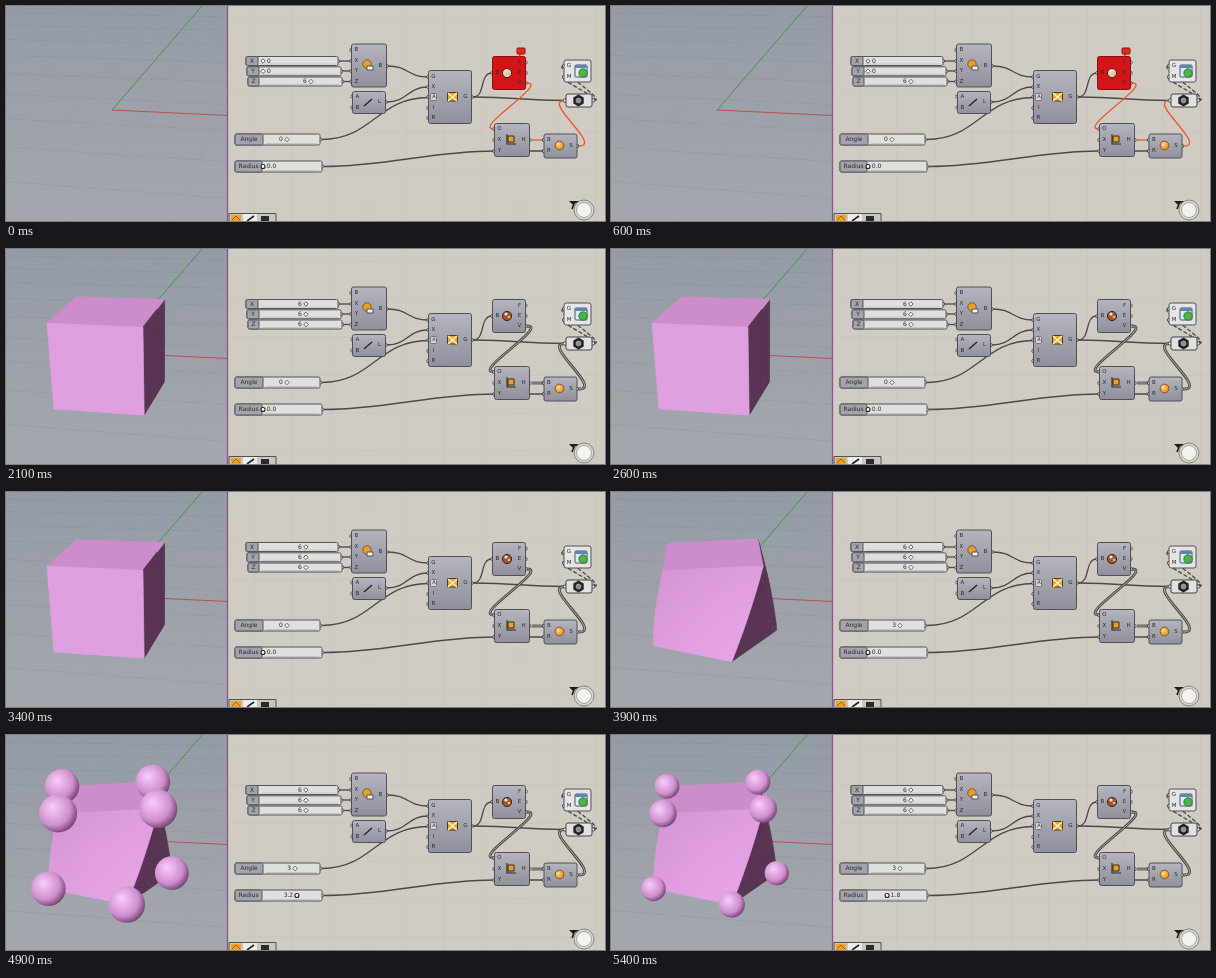
An HTML page with a canvas for the animation above (5500 ms loop, 599x215 px).

```html
<!DOCTYPE html>
<html lang="en">
<head>
<meta charset="utf-8">
<title>Twisted box definition</title>
<style>
html, body { margin: 0; width: 100%; height: 100%; overflow: hidden; }
canvas { display: block; }
</style>
</head>
<body>
<canvas id="stage" width="599" height="215"></canvas>
<script>
const ctx = document.getElementById('stage').getContext('2d');
const LOOP = 5500, STEP = 100;
const WIRE = '#4b4a48', ERROR_WIRE = '#f0562a';
const SHADOW = [88, 52, 82], MID = [204, 140, 203], LIGHT = [231, 165, 231];
const SUN = [-0.31, -0.85, 0.42];

// Slider values as [time, value] keys
const keys = {
  x: [[1400, 0], [1500, 1], [1900, 6]],
  y: [[600, 0], [1200, 6]],
  angle: [[3400, 0], [3800, 3]],
  radius: [[4200, 0], [4800, 3.2], [4900, 3.2], [5000, 5.2], [5100, 4.6], [5200, 3.4], [5300, 2.3], [5400, 1.8]]
};

function valueAt(track, t) {
  if (t <= track[0][0]) return track[0][1];
  for (let i = 1; i < track.length; i++) {
    const [t0, v0] = track[i - 1], [t1, v1] = track[i];
    if (t <= t1) return v0 + (v1 - v0) * (t - t0) / (t1 - t0);
  }
  return track[track.length - 1][1];
}

function slidersAt(t) {
  return {
    x: Math.round(valueAt(keys.x, t)),
    y: Math.round(valueAt(keys.y, t)),
    angle: valueAt(keys.angle, t),
    radius: valueAt(keys.radius, t)
  };
}

function line(points, color, width = 1) {
  ctx.beginPath();
  points.forEach(p => ctx.lineTo(p[0], p[1]));
  ctx.strokeStyle = color;
  ctx.lineWidth = width;
  ctx.stroke();
}

function rect(x, y, w, h, fill, stroke, r = 0) {
  ctx.beginPath();
  ctx.roundRect(x, y, w, h, r);
  ctx.fillStyle = fill;
  ctx.fill();
  if (stroke) {
    ctx.strokeStyle = stroke;
    ctx.lineWidth = 1;
    ctx.stroke();
  }
}

function disc(x, y, r, fill, stroke, width = 1) {
  ctx.beginPath();
  ctx.arc(x, y, r, 0, Math.PI * 2);
  ctx.fillStyle = fill;
  ctx.fill();
  if (stroke) {
    ctx.strokeStyle = stroke;
    ctx.lineWidth = width;
    ctx.stroke();
  }
}

function polygon(points, fill, stroke) {
  ctx.beginPath();
  points.forEach(p => ctx.lineTo(p[0], p[1]));
  ctx.closePath();
  ctx.fillStyle = fill;
  ctx.fill();
  if (stroke) {
    ctx.strokeStyle = stroke;
    ctx.lineWidth = 0.7;
    ctx.stroke();
  }
}

function label(text, x, y, size = 6, color = '#2b2b2e') {
  ctx.font = `${size}px "DejaVu Sans", sans-serif`;
  ctx.textAlign = 'center';
  ctx.textBaseline = 'middle';
  ctx.fillStyle = color;
  ctx.fillText(text, x, y);
}

// ---- 3D view ----

function project([x, y, z]) {
  const w = 1 - 0.015 * x + 0.045 * y - 0.03 * z;
  return [
    (103.3 + 43 * x + 17 * y - 4.7 * z) / w,
    (105.2 + 0.65 * x - 10.35 * y - 45 * z) / w,
    w
  ];
}

function twist([x, y, z], phi) {
  const c = Math.cos(phi * z), s = Math.sin(phi * z);
  return [x * c - y * s, x * s + y * c, z];
}

function shade(k) {
  const [from, to, f] = k < 0.4 ? [SHADOW, MID, k / 0.4] : [MID, LIGHT, (k - 0.4) / 0.6];
  return `rgb(${from.map((c, i) => Math.round(c + (to[i] - c) * f))})`;
}

// Diffuse light on a quad, from the cross product of its diagonals
function lightOn([a, b, c, d]) {
  const p = c.map((v, i) => v - a[i]), q = d.map((v, i) => v - b[i]);
  const n = [p[1] * q[2] - p[2] * q[1], p[2] * q[0] - p[0] * q[2], p[0] * q[1] - p[1] * q[0]];
  const dot = n.reduce((sum, v, i) => sum + v * SUN[i], 0);
  return Math.max(0, Math.min(1, dot / (Math.hypot(...n) || 1)));
}

function drawGround() {
  const sky = ctx.createLinearGradient(0, 0, 0, 215);
  sky.addColorStop(0, '#959ba5');
  sky.addColorStop(1, '#a4a8ae');
  ctx.fillStyle = sky;
  ctx.fillRect(0, 0, 222, 215);
  for (let k = -12; k <= 12; k += 1.6) {
    line([project([-11, k, 0]), project([11, k, 0])], 'rgba(110,116,126,.18)', 0.8);
    line([project([k, -12, 0]), project([k, 12, 0])], 'rgba(110,116,126,.1)', 0.8);
  }
  line([[106, 104], [196, 0]], '#3f9a44');
  line([[106, 104], [222, 109.5]], '#b8514f');
}

function drawSolid(hx, hy, phi) {
  const corners = [[-hx, -hy], [hx, -hy], [hx, hy], [-hx, hy]];
  const patches = [];
  const addPatch = quad => patches.push({ pts: quad.map(project), color: shade(lightOn(quad)) });
  const n = 16;
  corners.forEach(([ax, ay], side) => {
    const [bx, by] = corners[(side + 1) % 4];
    const point = (u, z) => twist([ax + (bx - ax) * u, ay + (by - ay) * u, z], phi);
    for (let i = 0; i < n; i++) {
      for (let j = 0; j < n; j++) {
        const u0 = i / n, u1 = (i + 1) / n, z0 = j / n * 2 - 1, z1 = (j + 1) / n * 2 - 1;
        addPatch([point(u0, z0), point(u1, z0), point(u1, z1), point(u0, z1)]);
      }
    }
  });
  addPatch(corners.map(([x, y]) => twist([x, y, 1], phi)));

  const area = p => p.reduce((sum, a, i) => {
    const b = p[(i + 1) % 4];
    return sum + a[0] * b[1] - b[0] * a[1];
  }, 0);
  const depth = p => p.reduce((sum, a) => sum + a[2], 0);
  patches.filter(p => area(p.pts) < 0)
    .sort((a, b) => depth(b.pts) - depth(a.pts))
    .forEach(p => polygon(p.pts, p.color, p.color));
}

function drawBall([x, y, w], radius) {
  const r = 5.5 * radius / w;
  const g = ctx.createRadialGradient(x - r * 0.3, y - r * 0.35, 0, x - r * 0.2, y - r * 0.2, r * 1.25);
  g.addColorStop(0, '#f6cff6');
  g.addColorStop(0.35, '#e5aee5');
  g.addColorStop(0.7, '#cd8fcd');
  g.addColorStop(1, '#794676');
  disc(x, y, r, g);
}

function drawModel(s) {
  if (s.y === 0) return;
  const hx = Math.max(s.x, 0.02) / 6, hy = s.y / 6;
  const phi = s.angle / 3 * 16 * Math.PI / 180;
  const balls = [];
  if (s.radius > 0) {
    for (const x of [-hx, hx]) for (const y of [-hy, hy]) for (const z of [-1, 1])
      balls.push(project(twist([x, y, z], phi)));
    balls.sort((a, b) => b[2] - a[2]);
    drawBall(balls.shift(), s.radius);
  }
  drawSolid(hx, hy, phi);
  balls.forEach(b => drawBall(b, s.radius));
}

// ---- node canvas ----

function wire(x0, y0, x1, y1, { reach = Math.abs(x1 - x0) / 2, list = false, color = WIRE, dash = [] } = {}) {
  const path = new Path2D();
  path.moveTo(x0, y0);
  path.bezierCurveTo(x0 + reach, y0, x1 - reach, y1, x1, y1);
  ctx.setLineDash(dash);
  ctx.strokeStyle = color;
  ctx.lineWidth = list ? 2.8 : 1.3;
  ctx.stroke(path);
  if (list) {
    ctx.strokeStyle = '#bbb7b0';
    ctx.lineWidth = 0.9;
    ctx.stroke(path);
  }
  ctx.setLineDash([]);
}

function grip(x, y) {
  disc(x, y, 1.7, '#f2f1ee', '#333', 0.8);
}

function node(x, y, w, h, inputs, outputs, fill, edge = '#505158') {
  const ports = [
    ...inputs.map(([name, ty]) => [name, ty, x, x + 5]),
    ...outputs.map(([name, ty]) => [name, ty, x + w, x + w - 6])
  ];
  ports.forEach(([, ty, px]) => grip(px, ty));
  const g = ctx.createLinearGradient(0, y, 0, y + h);
  g.addColorStop(0, '#b4b5be');
  g.addColorStop(1, '#8f909b');
  rect(x, y, w, h, fill || g, edge, 2);
  ports.forEach(([name, ty, , tx]) => label(name, tx, ty, 5.5));
}

function slider(name, x, y, w, h, split, knob, text, round) {
  grip(x + w, y + h / 2);
  rect(x, y, w, h, '#e0dfdc', '#55555a', 1.5);
  rect(x, y, split - x, h, '#a2a3ab', '#55555a', 1.5);
  const cy = y + h / 2;
  label(name, (x + split) / 2, cy, 6);
  line([[split + 3, y + h - 1.5], [x + w - 3, y + h - 1.5]], '#b5b4b1', 0.6);
  if (round) disc(knob, cy, 2, '#fff', '#222', 1.1);
  else polygon([[knob - 2.2, cy], [knob, cy - 2.2], [knob + 2.2, cy], [knob, cy + 2.2]], '#fff', '#222');
  const gap = text.length > 1 ? 8.5 : 6;
  const onRight = knob < (split + x + w) / 2 - 6;
  label(text, knob + (onRight ? gap : -gap), cy, 6);
}

function drawIcons(failed) {
  // box
  disc(361, 58, 4.2, '#e8a02c', '#6b4a16', 0.8);
  rect(361, 60, 6, 4, '#f7f2e6', '#555');
  // axis line
  line([[358, 100], [366, 93]], '#222', 1.3);
  // twist
  rect(441.5, 86.5, 10, 8.5, '#f0a52c', '#553c10');
  line([[442, 87], [451, 95]], '#fff6df', 1.3);
  line([[451, 87], [442, 95]], '#fff6df', 1.3);
  rect(424.5, 87.5, 6, 7, '#d4d4d8', '#777', 1);
  label('A', 428, 91, 5);
  // deconstruct
  disc(501, 67, 4.6, failed ? '#e9c9b8' : '#a45336', '#3e2118');
  disc(500, 65, 1.6, '#f4e2cf');
  disc(503, 68, 1.3, '#f0c04c');
  // plane box
  rect(502, 130, 6, 6, '#eda024', '#3b2b10');
  line([[501, 128], [501, 138], [510, 138]], '#2b2b2b', 1.1);
  // sphere
  const g = ctx.createRadialGradient(552, 138, 0.5, 553.5, 139.5, 5);
  g.addColorStop(0, '#ffd68a');
  g.addColorStop(1, '#dc7f16');
  disc(553.5, 139.5, 4.4, g, '#7b4a12', 0.8);
  // preview
  rect(569, 59, 12, 12, '#dfeaf3', '#3b5b7a', 1);
  rect(569, 59, 12, 3, '#5e86ad');
  disc(577, 67, 4.2, '#4db548', '#23702a', 0.8);
}

function drawHexNode() {
  grip(559, 94.5);
  grip(587, 94.5);
  rect(560, 88, 26, 13, '#e2e1df', '#444', 2);
  const hex = Array.from({ length: 6 }, (_, i) => {
    const a = (i + 0.5) * Math.PI / 3;
    return [572.5 + 6 * Math.cos(a), 94.5 + 6 * Math.sin(a)];
  });
  polygon(hex, '#252528');
  disc(572.5, 94.5, 2.4, '#8e8e92', '#bbb', 0.7);
}

function drawCorner() {
  rect(223, 207.5, 47, 9, '#c9c6c0', '#55524d');
  rect(225, 209, 10, 6, '#eda22c');
  line([[226, 214], [230, 210], [234, 214]], '#a65f12');
  rect(237, 208, 14, 7, '#eeece8');
  line([[241, 215], [248, 210]], '#222', 1.6);
  rect(255, 210, 8, 5, '#2b2b2b');
  disc(578, 204, 10, '#d8d6d1', '#88867f');
  disc(578, 204, 7.5, '#f3f2ef', '#a9a6a0');
  polygon([[563, 195], [573, 195], [567, 199]], '#1d1d1d');
  line([[566, 203], [568, 198]], '#1d1d1d', 1.6);
}

function drawNodes(s, t) {
  ctx.fillStyle = '#d0ccc4';
  ctx.fillRect(222, 0, 377, 215);
  for (let x = 248; x < 599; x += 38) line([[x, 0], [x, 215]], 'rgba(170,166,156,.1)');
  for (let y = 12; y < 215; y += 38) line([[223, y], [599, y]], 'rgba(170,166,156,.16)');
  line([[221.5, 0], [221.5, 215]], '#8d5588', 1.3);

  const failed = s.y === 0;
  const listWire = failed ? { color: ERROR_WIRE } : { list: true };
  wire(333, 55, 345, 55);
  wire(336, 65, 345, 65);
  wire(336, 75.5, 345, 75.5);
  wire(382, 60, 422, 71);
  wire(381, 96, 422, 81);
  wire(316, 133.5, 422, 91.5, { reach: 50 });
  wire(467, 91, 486, 67, { reach: 13 });
  wire(467, 91, 559, 94.5);
  wire(318, 160.5, 488, 145, { reach: 60 });
  wire(488, 145, 538, 145);
  wire(521, 77, 488, 123, { ...listWire, reach: 22 });
  wire(526, 134, 538, 134, listWire);
  wire(573, 140, 559, 94.5, { ...listWire, reach: 24 });
  wire(588, 94.5, 558, 60, { reach: 14, dash: [4, 2] });
  wire(588, 94.5, 558, 71, { reach: 10, dash: [4, 2] });

  const scale = v => 257 + 7.15 * v;
  slider('X', 240, 50.5, 92, 9, 252, scale(s.x), String(s.x));
  slider('Y', 241, 60.8, 94, 9, 253, scale(s.y), String(s.y));
  slider('Z', 242, 71, 94, 9, 253, t < 300 ? 305 : 300, '6');
  slider('Angle', 229, 128, 85, 11, 257, 281 + 2.7 * s.angle, String(Math.round(s.angle)));
  slider('Radius', 229, 155, 87, 11, 256, 257 + 10.6 * s.radius, s.radius.toFixed(1), true);

  node(345.5, 38, 35, 43, [['B', 44], ['X', 55], ['Y', 65], ['Z', 75.5]], [['B', 60]]);
  node(346.5, 85.5, 33, 22, [['A', 90.5], ['B', 101.5]], [['L', 96]]);
  node(422.5, 64.5, 43, 53, [['G', 71], ['X', 81], ['A', 91], ['I', 102], ['R', 112]], [['G', 91]]);
  node(486.5, 50.5, 33, 33, [['B', 67]], [['F', 56.5], ['E', 67], ['V', 77]],
    failed && '#d3151a', failed ? '#8d1010' : undefined);
  node(488.5, 117.5, 35, 33, [['O', 123], ['X', 134], ['Y', 145]], [['H', 134]]);
  node(538, 128, 33, 24, [['B', 134], ['R', 145]], [['S', 140]]);
  node(558, 54, 27, 22, [['G', 60], ['M', 71]], [], '#e6e5e3');
  if (failed) {
    rect(511, 42, 8, 6, '#dd2c25', '#8d1010', 1);
    polygon([[513, 48], [516, 48], [513, 51]], '#dd2c25');
  }
  drawIcons(failed);
  drawHexNode();
  drawCorner();
}

function draw(t) {
  ctx.clearRect(0, 0, 599, 215);
  drawGround();
  // the solid recomputes one step after its sliders
  drawModel(slidersAt(t - STEP));
  drawNodes(slidersAt(t), t);
}

const start = performance.now();
function tick() {
  const t = (performance.now() - start) % LOOP;
  draw(Math.floor(t / STEP) * STEP);
  requestAnimationFrame(tick);
}
tick();
</script>
</body>
</html>
```
